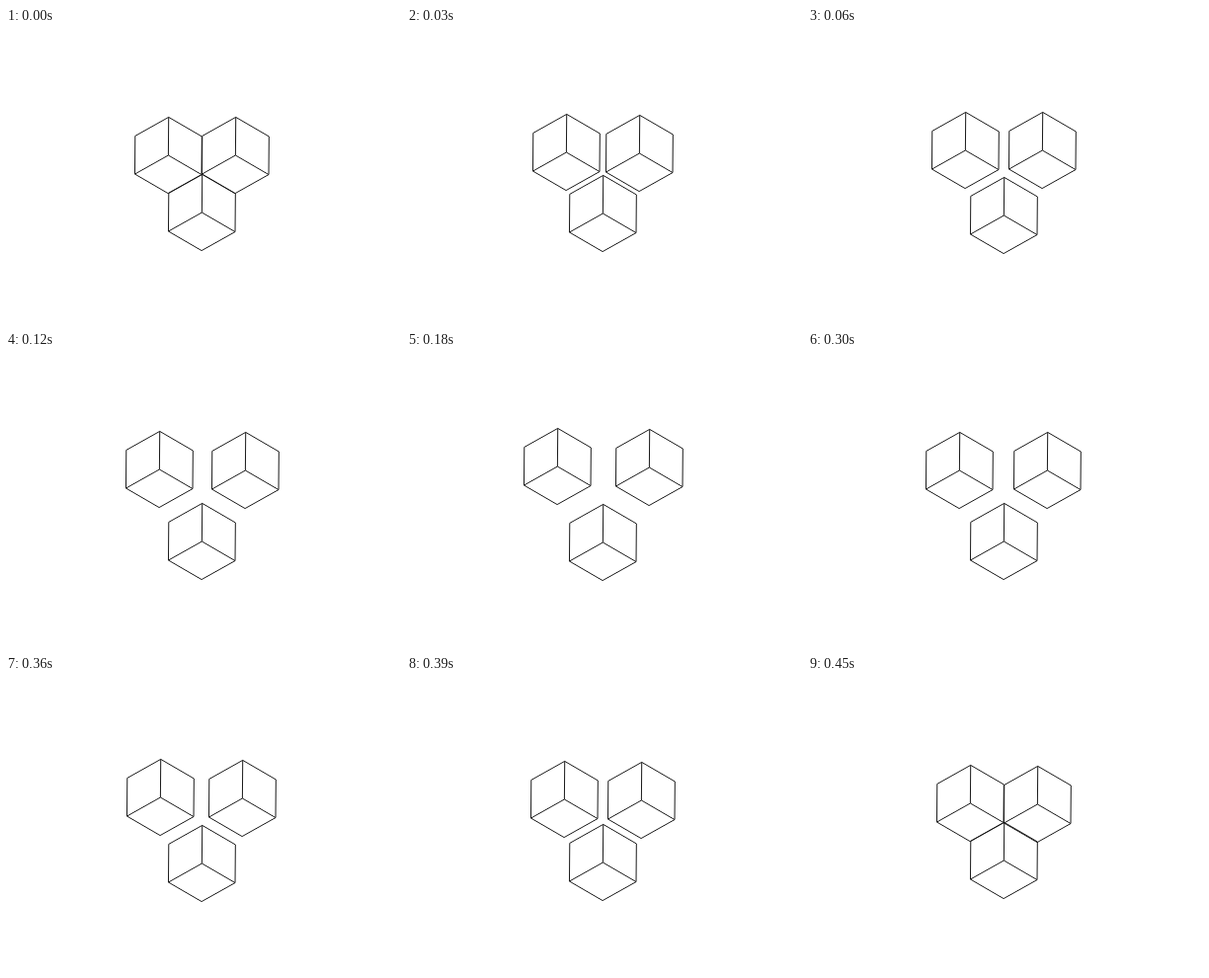
An HTML page with a canvas for the animation above (650 ms loop, 400 px wide and 300 px high).

```html
<!DOCTYPE html>
<html lang="en">
<head>
<meta charset="utf-8">
<title>Three cubes</title>
<style>
  html, body { margin: 0; width: 100%; height: 100%; overflow: hidden; background: #fff; }
  canvas { display: block; }
</style>
</head>
<body>
<canvas id="stage" width="400" height="300"></canvas>
<script>
const ctx = document.getElementById('stage').getContext('2d');
const LOOP = 650, STEP = 30, LAST_STEP = 15;
const RADIUS_X = 39, RADIUS_Y = 38.6, TILT = 0.008;

// Moves out to its reach at the peak step and back; bend sets the curvature,
// drift the distance by which it misses its starting place.
function swing(step, { reach, peak = 7, bend = 0.5, drift = 0 }) {
  const u = step < peak ? step / peak : (LAST_STEP - step) / (LAST_STEP - peak);
  const eased = u * (1 + bend - bend * u);
  return Math.round(reach * eased + drift * step / LAST_STEP);
}

const still = { reach: 0 };
const cubes = [
  { x: 164.4, y: 129,
    across: { reach: -14, peak: 8 },
    down: { reach: -13.6, peak: 6.5, bend: 0.4, drift: 0.4 } },
  { x: 232.4, y: 129,
    across: { reach: 14 },
    down: { reach: -13.3, bend: 0.4, drift: 1 } },
  { x: 198.4, y: 187,
    across: still,
    down: { reach: 6.4, bend: 0.7 } }
];

function drawCube(x, y) {
  const corner = k => {
    const angle = TILT - Math.PI / 2 + k * Math.PI / 3;
    return [x + RADIUS_X * Math.cos(angle), y + RADIUS_Y * Math.sin(angle)];
  };
  ctx.beginPath();
  for (let k = 0; k < 6; k++) ctx.lineTo(...corner(k));
  ctx.closePath();
  for (let k = 0; k < 6; k += 2) {
    ctx.moveTo(x, y);
    ctx.lineTo(...corner(k));
  }
  ctx.stroke();
}

function draw(time) {
  const step = Math.min(LAST_STEP, Math.floor((time % LOOP) / STEP));
  ctx.fillStyle = '#fff';
  ctx.fillRect(0, 0, 400, 300);
  ctx.strokeStyle = '#1a1a1a';
  ctx.lineWidth = 1;
  ctx.lineJoin = 'round';
  for (const { x, y, across, down } of cubes) {
    drawCube(x + swing(step, across), y + swing(step, down));
  }
}

const start = performance.now();
function tick() {
  draw(performance.now() - start);
  requestAnimationFrame(tick);
}
tick();
</script>
</body>
</html>
```
